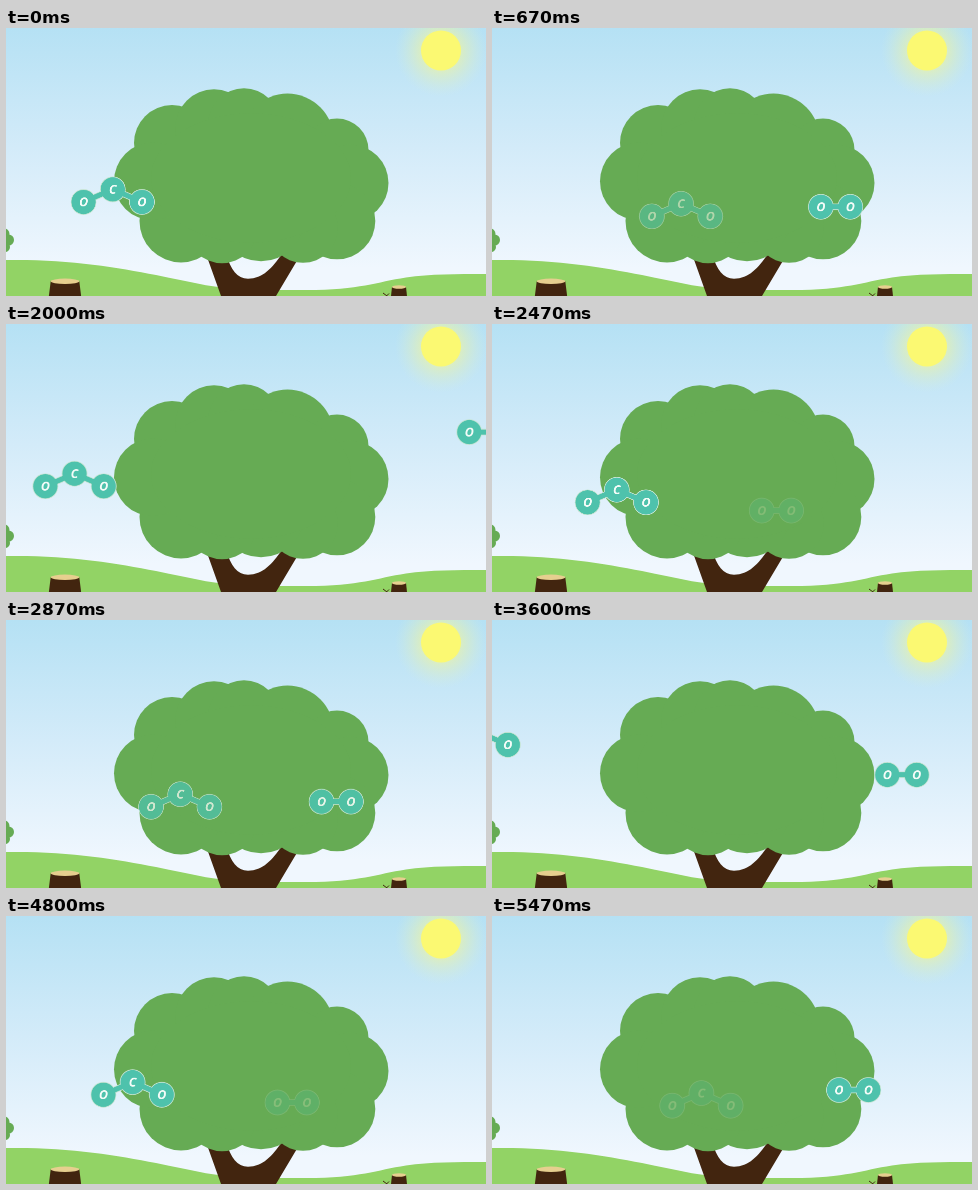
These frames come from a looping animation (480 px wide and 268 px high, 5540 ms). An HTML page with a canvas:

```html
<!DOCTYPE html>
<html lang="en">
<head>
<meta charset="utf-8">
<title>Tree breathing</title>
<style>
  html, body { margin: 0; width: 100%; height: 100%; overflow: hidden; }
  canvas { display: block; width: 100vw; height: 100vh; }
</style>
</head>
<body>
<canvas id="stage"></canvas>
<script>
const W = 480, H = 268, LOOP = 5540, FPS = 15;
const CYCLE = 34.78; // length of one breath, in steps of 1/15 s
const TEAL = '#4ec2ac', RIM = '#c5e4d2', LEAF = '#66ab54', GRASS = '#92d365', BARK = '#42250f', WOOD = '#e6cf8f';
const dpr = window.devicePixelRatio || 1;
const clamp = v => Math.max(0, Math.min(1, v));

function layer(w, h, scale) {
  const el = document.createElement('canvas');
  el.width = Math.round(w * scale);
  el.height = Math.round(h * scale);
  const c = el.getContext('2d');
  c.scale(scale, scale);
  return c;
}

function disc(c, x, y, r, fill) {
  c.fillStyle = fill;
  c.beginPath();
  c.arc(x, y, r, 0, Math.PI * 2);
  c.fill();
}

function shape(c, path, fill) {
  c.fillStyle = fill;
  c.fill(new Path2D(path));
}

function stump(c, x, y, rx, ry, flare) {
  shape(c, `M${x - rx} ${y}L${x - rx - flare} 268H${x + rx + flare}L${x + rx} ${y}Z`, BARK);
  c.fillStyle = WOOD;
  c.beginPath();
  c.ellipse(x, y, rx, ry, 0, 0, Math.PI * 2);
  c.fill();
}

function paintScene() {
  const c = layer(W, H, dpr);

  const sky = c.createLinearGradient(0, 0, 0, 240);
  sky.addColorStop(0, '#b5e1f4');
  sky.addColorStop(0.5, '#d3ebf9');
  sky.addColorStop(1, '#f0f7fe');
  c.fillStyle = sky;
  c.fillRect(0, 0, W, H);

  const glow = c.createRadialGradient(435, 22.5, 19, 435, 22.5, 46);
  glow.addColorStop(0, 'rgba(238,244,160,.62)');
  glow.addColorStop(0.4, 'rgba(226,240,185,.4)');
  glow.addColorStop(1, 'rgba(215,238,215,0)');
  c.fillStyle = glow;
  c.fillRect(380, 0, 100, 80);
  disc(c, 435, 22.5, 20, '#fbf972');

  shape(c, 'M0 232C60 231 110 239 150 247C185 254 215 262 250 262H300' +
    'C355 262 370 254 400 249.5C425 246 450 246 480 246V268H0Z', GRASS);

  for (const [x, y, r] of [[-2, 206, 5.5], [2.5, 212, 5.5], [-1, 219, 5]]) disc(c, x, y, r, LEAF);

  shape(c, 'M200 226L215 268H270L295 226H276C266 240 257 250.7 242 250.7C231 250.7 225 242 220 226Z', BARK);

  const crown = [
    [166, 115, 38], [208, 100, 38.7], [238, 96, 35.7], [281.5, 112, 46.4], [331, 122, 31.5], [344, 155, 38.5],
    [331, 193, 38.3], [297, 200, 34.8], [255, 190, 43.3], [216, 200, 35.3], [175, 193, 41.5], [147, 153.3, 39]
  ];
  for (const [x, y, r] of crown) disc(c, x, y, r, LEAF);
  c.beginPath();
  c.ellipse(245, 150, 100, 65, 0, 0, Math.PI * 2);
  c.fill();

  stump(c, 59, 253.3, 14.3, 2.7, 1.8);
  stump(c, 393, 259, 7, 1.8, 1);
  c.strokeStyle = BARK;
  c.lineWidth = 1;
  c.stroke(new Path2D('M377 265L381 268M383 265.5L380.5 268'));
  return c.canvas;
}

// Atoms are [letter, x, y] around the molecule's anchor, bonded in order.
function paintMolecule(atoms) {
  const c = layer(96, 64, dpr * 2);
  c.translate(48, 26);
  const body = (grow, color) => {
    c.strokeStyle = color;
    c.lineWidth = 5 + grow * 2;
    c.beginPath();
    for (const [, x, y] of atoms) c.lineTo(x, y);
    c.stroke();
    for (const [, x, y] of atoms) disc(c, x, y, 12.1 + grow, color);
  };
  body(0.8, RIM);
  body(0, TEAL);

  c.fillStyle = '#f4fcf8';
  c.font = 'italic 700 12.5px "Open Sans", "Noto Sans", sans-serif';
  c.textAlign = 'center';
  for (const [letter, x, y] of atoms) c.fillText(letter, x, y + 4.4);
  return c.canvas;
}

const view = document.getElementById('stage');
view.width = Math.round(W * dpr);
view.height = Math.round(H * dpr);
const ctx = view.getContext('2d');
ctx.scale(dpr, dpr);

const scene = paintScene();
const carbonDioxide = paintMolecule([['O', -29.2, 12.6], ['C', 0, 0], ['O', 29.2, 12.6]]);
const oxygen = paintMolecule([['O', -14.7, 0], ['O', 14.7, 0]]);

// Places a molecule on a circular arc whose lowest point is (x, y).
function ride(img, x, y, radius, angle, alpha) {
  ctx.globalAlpha = clamp(alpha);
  ctx.drawImage(img,
    x + radius * Math.sin(angle) - 48,
    y - radius * (1 - Math.cos(angle)) - 26, 96, 64);
  ctx.globalAlpha = 1;
}

function draw(ms) {
  const step = Math.floor((ms % LOOP) * FPS / 1000 + 0.001);
  ctx.drawImage(scene, 0, 0, W, H);

  const left = CYCLE - (step - 15.2 + CYCLE) % CYCLE;
  ride(carbonDioxide, 232.5, 177.6, 495, -0.0169 * left, (left - 1.1) / 7.8);

  const born = step - 1;
  if (born >= 0) {
    const age = (born + 0.5) % CYCLE - 0.5;
    ride(oxygen, 275.1, 186.7, 301, 0.0255 * age, (age + 0.5) / 8.5);
  }
}

const start = performance.now();
function tick() {
  draw(performance.now() - start);
  requestAnimationFrame(tick);
}
tick();
</script>
</body>
</html>
```
